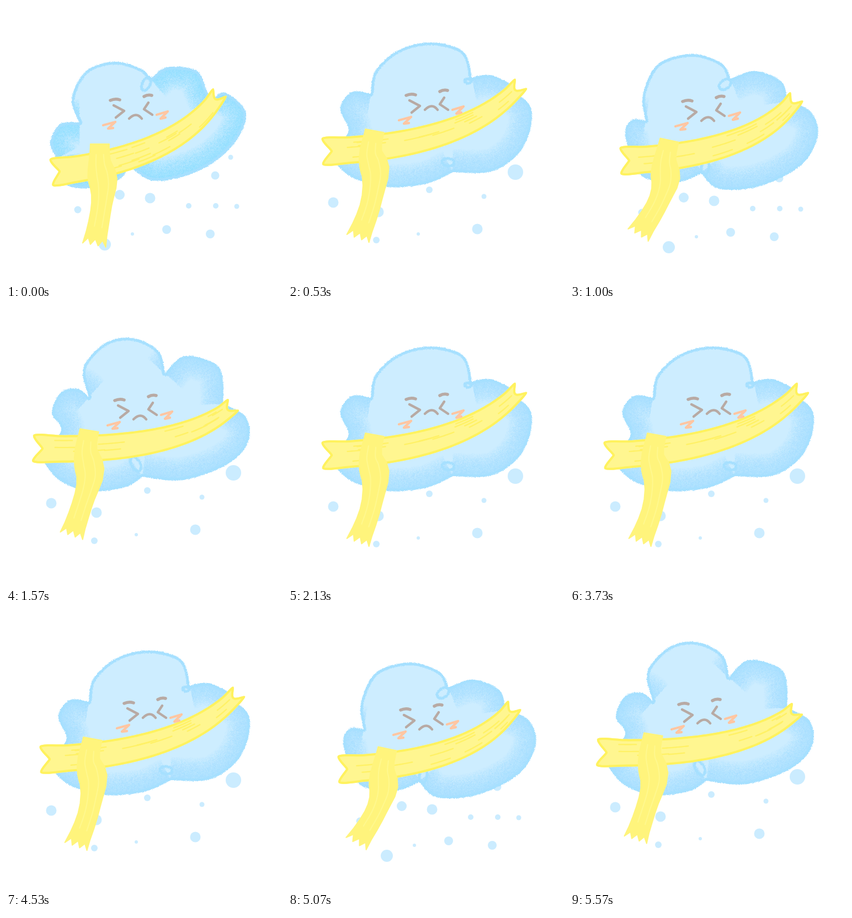
An HTML page with a canvas for the animation above (5.61 s loop, 500 by 500 pixels).

```html
<!DOCTYPE html>
<html lang="en">
<head>
<meta charset="utf-8">
<title>Cold little cloud</title>
<style>
html, body { margin: 0; width: 100%; height: 100%; overflow: hidden; background: #fff; }
canvas { display: block; width: 500px; height: 500px; }
</style>
</head>
<body>
<canvas id="stage" width="500" height="500"></canvas>
<script>
const SIZE = 500, LOOP = 5610, CYCLE = 800, POSE_TIME = 200;
const STEPS = [0, 70, 100, 130, 170];

const points = text => text.split(' ').map(s => s.split(',').map(Number));

// x, y, radius
const lightSnow = points('407,274,4.5 379,307,7.5 261,348,9.5 206,342,9 130,369,6.5 331,362,5 380,362,5 418,363,4.5 291,405,8 370,413,8 229,413,3 179,432,11');
const heavySnow = points('412,295,14 82,350,9.5 256,327,6 355,339,4.5 343,398,9.5 236,407,3 160,418,6 164,367,9.5');

// Lobes run clockwise from the top one, each starting where the last one ended.
// ref is the moment in the cycle whose bob is already part of the drawing.
const poses = [
  {
    ref: 0, snow: lightSnow, drop: 0, shade: '#94d7ff',
    lobes: ['119,168 145,118 197,101 245,114 262,132', '292,111 345,117 363,152 372,172',
      '397,157 435,195 410,253 350,298 270,317 222,289', '205,314 150,330 106,321 92,276', '80,247 98,214 133,211'],
    loops: [[254, 141, 7, 13, .45]],
    band: points('95,300 310,274 382,165'),
    tail: points('170,250 170,285 176,325 171,375 160,432'),
    face: [232, 188, 9]
  },
  {
    ref: 200, snow: lightSnow, drop: 5, shade: '#a2deff',
    lobes: ['132,160 160,105 222,87 275,104 291,132', '335,118 383,137 393,172',
      '435,191 449,233 420,287 345,326 270,331 238,303', '195,319 135,311 110,275', '100,228 113,206 137,208'],
    loops: [[281, 142, 8, 12, .9], [245, 292, 7, 13, .1]],
    band: points('105,280 330,269 405,172'),
    tail: points('180,243 172,280 172,320 155,365 124,414'),
    face: [247, 190, 11]
  },
  {
    ref: 530, snow: heavySnow, drop: 6, shade: '#a2deff',
    lobes: ['158,118 200,80 260,66 318,83 333,130', '365,125 400,140 415,158',
      '440,185 437,230 414,271 367,300 298,301', '250,322 180,328 120,312 89,285 92,250', '110,225 95,186 115,156 150,159'],
    loops: [[326, 136, 6, 4, 0], [290, 283, 11, 7, .1]],
    band: points('77,263 320,253 415,149'),
    tail: points('157,226 150,265 158,305 148,365 127,420'),
    face: [257, 179, 2]
  },
  {
    ref: 770, snow: heavySnow, drop: 0, shade: '#a2deff',
    lobes: ['140,105 180,60 230,51 276,74 288,115', '315,87 345,85 388,107 394,170',
      '435,195 438,240 400,280 320,308 247,302', '215,321 150,328 95,307 62,265', '100,219 83,186 100,149 130,143 150,158'],
    loops: [[235, 279, 8, 14, -.5]],
    band: points('64,251 310,258 405,178'),
    tail: points('151,218 145,255 152,300 137,355 119,408'),
    face: [240, 181, 10]
  }
];

let seed;
function random() {
  seed = (seed + 0x6D2B79F5) | 0;
  let t = Math.imul(seed ^ (seed >>> 15), 1 | seed);
  t = (t + Math.imul(t ^ (t >>> 7), 61 | t)) ^ t;
  return ((t ^ (t >>> 14)) >>> 0) / 4294967296;
}

function layer() {
  const c = document.createElement('canvas');
  c.width = c.height = SIZE;
  return c.getContext('2d');
}

// Catmull-Rom curve through p, u from 0 to 1
function spline(p, u) {
  const n = p.length - 1, i = Math.max(0, Math.min(n - 1, Math.floor(u * n))), t = u * n - i;
  const [a, b, c, d] = [p[Math.max(0, i - 1)], p[i], p[i + 1], p[Math.min(n, i + 2)]];
  return [0, 1].map(k => b[k] + t / 2 * (c[k] - a[k] + t * (2 * a[k] - 5 * b[k] + 4 * c[k] - d[k]
    + t * (3 * (b[k] - c[k]) + d[k] - a[k]))));
}

const quad = ([a, b, c], u) => [0, 1].map(k =>
  (1 - u) ** 2 * a[k] + 2 * u * (1 - u) * b[k] + u * u * c[k]);

const range = (n, from, to) => Array.from({ length: n + 1 }, (_, i) => from + (to - from) * i / n);

function trace(p, path = new Path2D()) {
  for (const u of range((p.length - 1) * 8, 0, 1)) path.lineTo(...spline(p, u));
  return path;
}

// Place on a strip: u along it, s from -1 to 1 across it
function ribbon(centre, half) {
  return (u, s) => {
    const [x, y] = centre(u), [ax, ay] = centre(u - .01), [bx, by] = centre(u + .01);
    const k = s * half(u) / Math.hypot(bx - ax, by - ay);
    return [x - (by - ay) * k, y + (bx - ax) * k];
  };
}

function line(g, path, color, width, cap = 'round') {
  g.strokeStyle = color;
  g.lineWidth = width;
  g.lineCap = cap;
  g.lineJoin = 'round';
  g.stroke(path);
}

function patch(g, path, fill, edge, width) {
  g.save();
  g.fillStyle = fill;
  g.fill(path);
  g.clip(path);
  line(g, path, edge, width * 2);
  g.restore();
}

// Grainy chalk that fades inwards from the lobes
function shading(lobes, color) {
  const g = layer();
  g.globalAlpha = .09;
  for (let w = 4; w <= 84; w += 4)
    for (const lobe of lobes) line(g, lobe, color, w, 'butt');
  const img = g.getImageData(0, 0, SIZE, SIZE), d = img.data;
  for (let i = 3; i < d.length; i += 4) {
    const a = d[i] / 255;
    if (a) d[i] = 255 * (a + (random() - .5) * 2.4 * a * (1 - a));
  }
  g.putImageData(img, 0, 0);
  return g.canvas;
}

// Crayon edge: some pixels take a close neighbour
function roughen(g) {
  const src = g.getImageData(0, 0, SIZE, SIZE), out = g.createImageData(SIZE, SIZE);
  const from = new Uint32Array(src.data.buffer), to = new Uint32Array(out.data.buffer);
  const nudge = () => Math.round((random() - .5) * 1.5);
  for (let y = 2; y < SIZE - 2; y++)
    for (let x = 2; x < SIZE - 2; x++)
      to[y * SIZE + x] = from[(y + nudge()) * SIZE + x + nudge()];
  g.putImageData(out, 0, 0);
}

function drawCloud(g, { lobes, loops, shade }) {
  const lists = lobes.map(points), body = new Path2D();
  const arcs = lists.map((p, i) => {
    const arc = [lists[(i + 4) % 5].at(-1), ...p];
    trace(arc, body);
    return trace(arc);
  });
  body.closePath();
  g.save();
  g.fillStyle = '#cdedff';
  g.fill(body);
  g.clip(body);
  g.drawImage(shading(arcs.slice(1), shade), 0, 0);
  line(g, body, '#a6e0ff', 10);
  g.restore();
  for (const [x, y, rx, ry, turn] of loops) {
    const loop = new Path2D();
    loop.ellipse(x, y, rx, ry, turn, 0, 7);
    line(g, loop, '#a6e0ff', 5);
  }
  roughen(g);
}

function drawSnow(g, { snow, drop }) {
  g.save();
  g.globalCompositeOperation = 'destination-over';
  g.fillStyle = '#cbecff';
  for (const [x, y, r] of snow) {
    g.beginPath();
    g.arc(x, y + drop, r, 0, 7);
    g.fill();
  }
  g.restore();
}

function drawBand(g, pose) {
  const at = ribbon(u => quad(pose.band, u), u => 25 - 10 * u * u);
  const along = range(10, -.03, 1.04);
  const notch = at(0, 0);
  const edge = [notch, ...along.map(u => at(u, -1)), at(.99, 0), ...along.reverse().map(u => at(u, 1)), notch];
  patch(g, trace(edge), '#fff690', '#fff25e', 4);
  for (let i = 0; i < 14; i++) {
    const u = .04 + .85 * random(), s = 1.4 * random() - .7, len = .06 + .08 * random();
    line(g, trace(range(3, u, u + len).map(v => at(v, s))), '#fff166', 2.4);
  }
}

function drawTail(g, pose) {
  const at = ribbon(v => spline(pose.tail, v),
    v => 17 + 9 * Math.exp(-(((v - .42) / .17) ** 2)) + 4 * v ** 6);
  const along = range(12, 0, .9), path = new Path2D();
  for (const v of along) path.lineTo(...at(v, 1));
  range(6, 1, -1).forEach((s, i) => path.lineTo(...at(i % 2 ? .94 : 1.01, s)));
  for (const v of along.reverse()) path.lineTo(...at(v, -1));
  path.closePath();
  g.fillStyle = '#fff47c';
  g.fill(path);
  line(g, path, '#fff47c', 2);
  for (const s of [-.4, .35])
    line(g, trace(range(6, .15, .85).map(v => at(v, s))), '#fff88e', 2);
}

function drawFace(g, [x, y, mouth]) {
  g.save();
  g.translate(x, y);
  line(g, new Path2D('M-43,-17Q-34,-21 -26,-18M18,-24Q25,-28 32,-26'), '#b8aaa4', 5.5);
  line(g, new Path2D('M-37,-8L-18,2L-33,14M26,-13L18,-1L33,9'), '#b8aaa4', 4.5);
  line(g, new Path2D(`M-9,${mouth + 7}Q4,${mouth - 6} 14,${mouth + 7}`), '#b8aaa4', 4.5);
  line(g, new Path2D('M-56,28L-34,22L-47,34L-38,33M41,9L61,3L48,16L57,14'), '#ffc6a2', 4.4);
  g.restore();
}

function render(pose) {
  const g = layer();
  seed = 7;
  drawCloud(g, pose);
  drawSnow(g, pose);
  drawBand(g, pose);
  drawTail(g, pose);
  drawFace(g, pose.face);
  return g.canvas;
}

function bob(t) {
  const a = t / CYCLE * 2 * Math.PI;
  return 3.2 * (1 - Math.cos(a)) + .95 * (1 - Math.cos(2 * a));
}

const pictures = poses.map(render);
const stage = document.getElementById('stage').getContext('2d');
const start = performance.now();

function frame() {
  const t = Math.min((performance.now() - start) % LOOP, 5599) % CYCLE;
  const index = Math.floor(t / POSE_TIME), local = t % POSE_TIME;
  const held = index * POSE_TIME + STEPS.filter(s => s <= local).pop();
  stage.fillStyle = '#fff';
  stage.fillRect(0, 0, SIZE, SIZE);
  stage.drawImage(pictures[index], 0, Math.round(bob(held) - bob(poses[index].ref)));
  requestAnimationFrame(frame);
}
frame();
</script>
</body>
</html>
```
